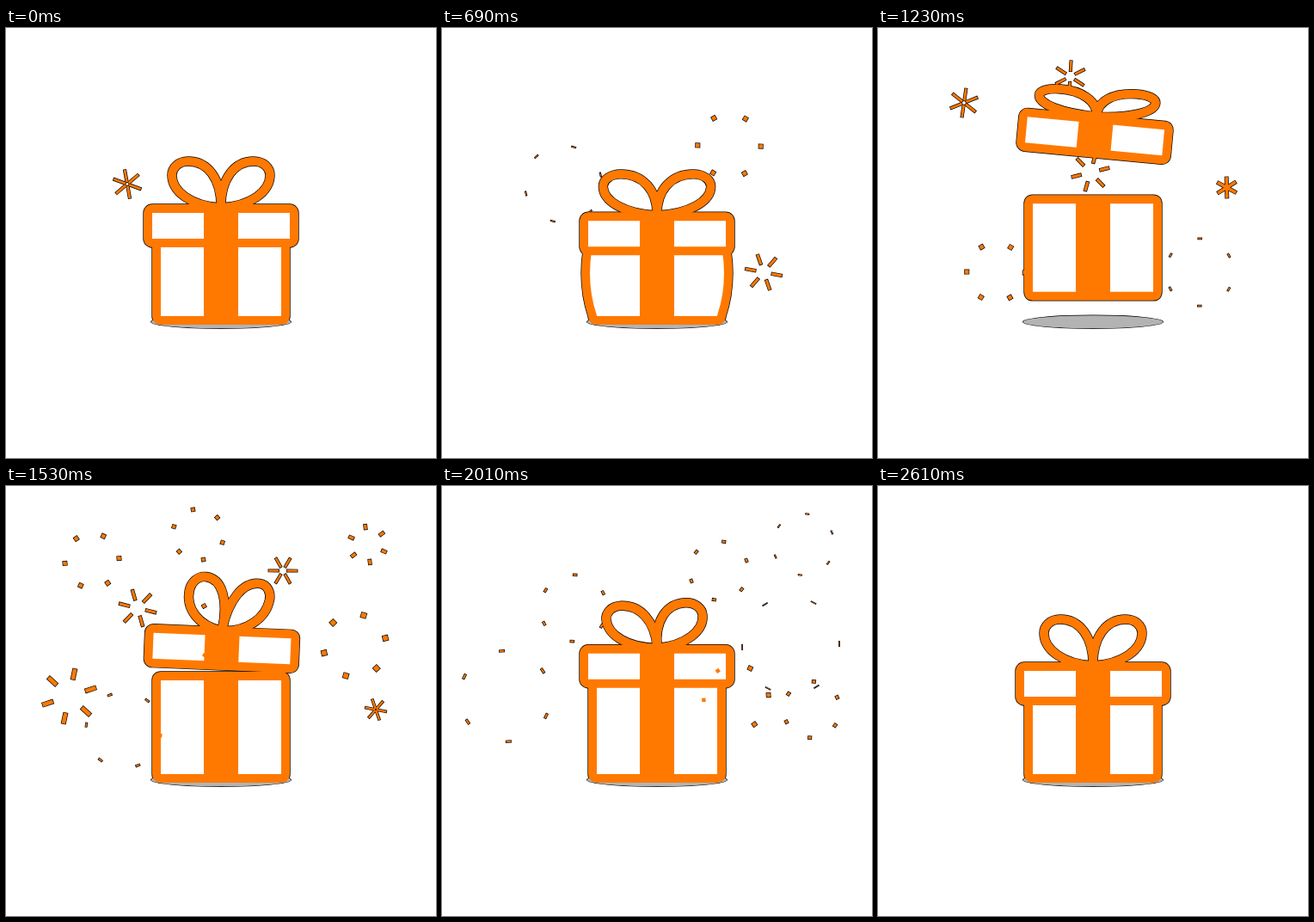
These frames come from a looping animation (500x500 px, 2.64 s). An HTML page with a canvas:

```html
<!DOCTYPE html>
<html lang="en">
<head>
<meta charset="utf-8">
<title>Gift box</title>
<style>
html, body { margin: 0; height: 100%; overflow: hidden; background: #fff; }
canvas { display: block; width: 500px; height: 500px; }
</style>
</head>
<body>
<canvas id="stage" width="500" height="500"></canvas>
<script>
const ctx = document.getElementById('stage').getContext('2d');
const { PI, sin, cos, min, max, sign } = Math;
const LOOP = 2640, STEP = 30, BURST_LIFE = 850;
const LEAP_START = 1110, LEAP_END = 1530, SETTLED = 2610;
const ORANGE = '#ff7900', EDGE = '#000', GREY = '#b3b3b3';
const RAD = PI / 180;

// Bursts in order of appearance: x, y, reach, angle; a negative angle turns backwards.
const BURSTS = [
  [141, 181.5, 45, 13], [334, 137, 45, 34], [374, 284, 40, 58], [137, 284, 45, 36],
  [247, 168, 39.5, 32], [223.5, 56.5, 38, -16], [100, 87, 44, 31], [405.5, 185.5, 56.5, 25],
  [420.5, 68, 36, 4], [73.5, 244.5, 54, -2], [153, 142, 40.5, 1], [322, 98.5, 37, -50],
  [430, 260, 37, 5], [342, 246, 45, 28]
];

const clamp = value => max(0, min(1, value));
const progress = (time, from, to) => clamp((time - from) / (to - from));
const mix = (a, b, u) => a + (b - a) * u;

// A few slow bursts come first; the rest go off in quick succession with the leap.
const burstStart = i => i < 4 ? 300 * i - 95 : 1025 + 53 * (i - 4);

// The box is pressed down, leaps open, then settles.
function poseAt(time) {
  if (time < LEAP_START) {
    const u = time / LEAP_START, squash = sin(u * PI / 2);
    return {
      lidY: 230 + 15 * u, tilt: 0, bottom: 345, height: 120, bulge: 8 * (1 - (2 * u - 1) ** 4),
      bow: { width: 1 + .12 * squash, height: 1 - .135 * squash, sway: 0 }
    };
  }
  if (time < LEAP_END) {
    const u = progress(time, LEAP_START, LEAP_END), arc = sin(PI * u);
    return {
      lidY: mix(245, 189, u) - 132 * arc, tilt: 2.4 * u + 6 * arc,
      bottom: 345 - 36 * arc, height: 120 + 9 * u, bulge: 0,
      bow: { width: mix(1.12, .82, u) + .2 * arc, height: mix(.865, 1.1, u) - .5 * arc, sway: .17 * u - .13 * arc }
    };
  }
  const u = progress(time, LEAP_END, SETTLED), rest = 1 - u, wave = rest * cos(2.25 * PI * u);
  return {
    lidY: 230 - 41 * rest ** 1.2, tilt: 2.4 * clamp(1 - 2.25 * u),
    bottom: 345, height: 120 + 9 * rest, bulge: 0,
    bow: { width: 1 - .18 * rest ** 4, height: 1 + .1 * wave, sway: .17 * wave }
  };
}

function paintPanel(color, grow) {
  ctx.fillStyle = '#fff';
  ctx.strokeStyle = color;
  ctx.lineWidth = 10 + 2 * grow;
  ctx.fill();
  ctx.stroke();
  ctx.fillStyle = color;
}

function drawBody({ bottom, height, bulge }, color, grow) {
  const y = height / 2 - 5, side = 75 + bulge * 4 / 3;
  ctx.save();
  ctx.translate(250, bottom - height / 2);
  ctx.beginPath();
  for (const s of [1, -1]) {
    ctx.lineTo(70 * s, -y * s);
    ctx.quadraticCurveTo(75 * s, -y * s, 75 * s, (5 - y) * s);
    ctx.bezierCurveTo(side * s, -y / 3 * s, side * s, y / 3 * s, 75 * s, (y - 5) * s);
    ctx.quadraticCurveTo(75 * s, y * s, 70 * s, y * s);
  }
  ctx.closePath();
  paintPanel(color, grow);
  ctx.fillRect(-20, -y, 40, 2 * y);
  ctx.restore();
}

function drawBow({ width, height, sway }, color, grow) {
  ctx.strokeStyle = color;
  ctx.lineWidth = 10 + 2 * grow;
  for (const side of [-1, 1]) {
    ctx.save();
    ctx.translate(0, -25);
    ctx.transform(1, .5 * sway, -sway, 1, 0, 0);
    ctx.scale(side * width, height);
    ctx.beginPath();
    ctx.moveTo(0, 2);
    ctx.bezierCurveTo(0, -29, 15, -50, 38, -50);
    ctx.bezierCurveTo(50, -50, 57, -42, 57, -34);
    ctx.bezierCurveTo(57, -15, 35, 2, 0, 4);
    ctx.restore();
    ctx.stroke();
  }
}

function drawBox(pose, color, grow) {
  drawBody(pose, color, grow);
  ctx.save();
  ctx.translate(250 + .38 * pose.tilt, pose.lidY);
  ctx.rotate(pose.tilt * RAD);
  drawBow(pose.bow, color, grow);
  ctx.beginPath();
  ctx.roundRect(-85, -20, 170, 40, 5);
  paintPanel(color, grow);
  ctx.fillRect(-20, -20, 40, 40);
  ctx.restore();
}

// Thin rays shorten into square dots, then shrink to slivers.
function drawBurst([x, y, reach, angle], u, color, grow) {
  if (u < .04 || u >= 1) return;
  const ease = 1 - (1 - u) ** 2, size = reach / 45;
  const ray = clamp((.4 - u) / .2) * clamp(10 * u), thin = clamp((.4 - u) / .28);
  const length = size * (4.6 * clamp((1 - u) / .42) + 10 * ray) + 2 * grow;
  const width = size * (4.6 - 1.8 * thin) + 2 * grow;
  ctx.fillStyle = color;
  for (let i = 0; i < 6; i++) {
    ctx.save();
    ctx.translate(x, y);
    ctx.rotate((angle + sign(angle) * 33 * ease + 60 * i) * RAD);
    ctx.fillRect(reach * ease - length / 2, -width / 2, length, width);
    ctx.restore();
  }
}

function drawShadow(color, grow) {
  ctx.fillStyle = color;
  ctx.beginPath();
  ctx.ellipse(250, 341.7, 81.3 + grow, 7.5 + grow, 0, 0, 2 * PI);
  ctx.fill();
}

function draw(time) {
  const pose = poseAt(time);
  ctx.fillStyle = '#fff';
  ctx.fillRect(0, 0, 500, 500);
  // A dark pass first leaves a thin edge around the whole silhouette.
  for (const [color, shade, grow] of [[EDGE, EDGE, .7], [ORANGE, GREY, 0]]) {
    drawShadow(shade, grow);
    drawBox(pose, color, grow);
    BURSTS.forEach((burst, i) => drawBurst(burst, (time - burstStart(i)) / BURST_LIFE, color, grow));
  }
}

function frame(now) {
  draw(Math.floor(now / STEP) * STEP % LOOP);
  requestAnimationFrame(frame);
}
requestAnimationFrame(frame);
</script>
</body>
</html>
```
